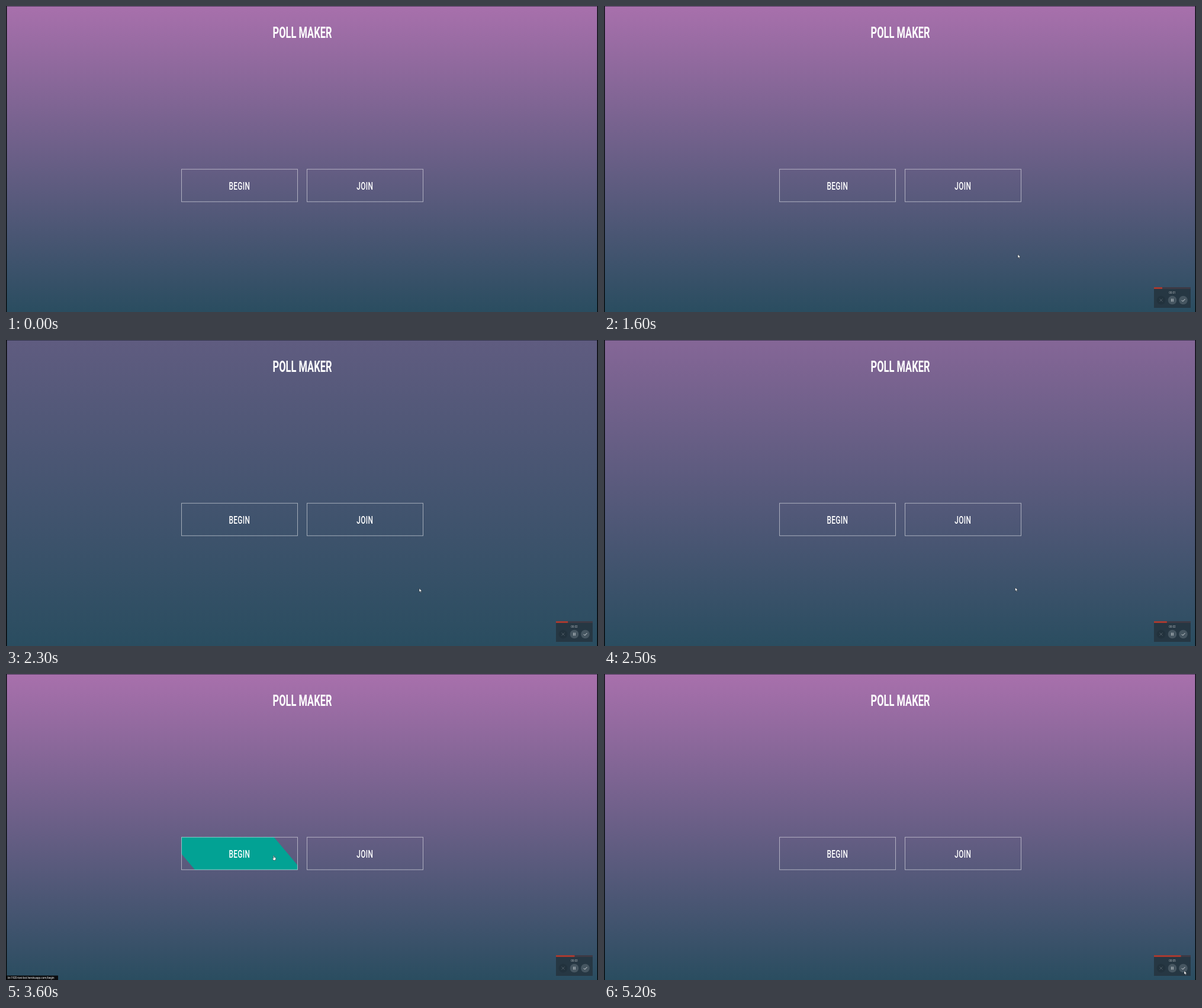
Write an HTML page that moves like this. It is 1000 px wide and 518 px high and loops after 5.3 s.

```html
<!DOCTYPE html>
<html lang="en">
<head>
<meta charset="utf-8">
<title>Poll Maker</title>
<style>
  html, body { margin: 0; width: 100%; height: 100%; overflow: hidden; background: #000; }
  svg { display: block; width: 100%; height: 100%; }
  text { fill: #fff; font-family: Roboto, "Open Sans", sans-serif; }
  .narrow { text-anchor: middle; }
  .title { font-size: 25px; font-weight: 700; }
  .label { font-size: 18px; font-weight: 500; letter-spacing: .5px; }
  .frame { fill: none; stroke: #fff; stroke-opacity: .52; }
  .tiny { font-size: 4.6px; }
  .icon { fill: none; stroke: #e4e8ea; stroke-width: .9; }
</style>
</head>
<body>
<svg viewBox="0 0 1000 518" preserveAspectRatio="none">
  <defs>
    <linearGradient id="sky" x1="0" y1="0" x2="0" y2="1">
      <stop offset="0" stop-color="#a870ac"/>
      <stop offset="1" stop-color="#2a4d60"/>
    </linearGradient>
    <clipPath id="inside"><rect x="296.5" y="276" width="196" height="55.5"/></clipPath>
  </defs>

  <rect x="1.5" width="997" height="518" fill="#2a4d60"/>
  <rect id="glow" x="1.5" width="997" height="518" fill="url(#sky)"/>
  <path d="M1.5 .5H998.5" stroke="#171b2b" stroke-opacity=".6"/>

  <!-- one ratio gives every heading the same narrow face -->
  <g class="narrow" transform="translate(500.5 54) scale(.66 1)"><text class="title">POLL MAKER</text></g>

  <g clip-path="url(#inside)"><path id="fill" fill="#02a294"/></g>

  <g id="buttons">
    <rect class="frame" x="296.5" y="276.3" width="196" height="55"/>
    <rect class="frame" x="508.5" y="276.3" width="196" height="55"/>
    <g class="narrow" transform="translate(394.3 311) scale(.66 1)"><text class="label">BEGIN</text></g>
    <g class="narrow" transform="translate(606.3 311) scale(.66 1)"><text class="label">JOIN</text></g>
  </g>

  <g id="status">
    <rect x="1" y="510.5" width="87" height="7.5" fill="#0a0b0d"/>
    <text class="tiny" x="3" y="516">bt-1920-tovi-bot.herokuapp.com/begin</text>
  </g>

  <g id="panel">
    <rect x="929" y="476" width="62" height="35" fill="#263743"/>
    <rect x="929" y="476" width="62" height="3" fill="#3d3a45"/>
    <rect id="bar" x="929" y="476" height="3" fill="#a83a30"/>
    <text id="clock" class="tiny" x="960" y="487" text-anchor="middle" fill-opacity=".65"></text>
    <circle cx="941" cy="498" r="7.3" fill="#22323d"/>
    <circle cx="960" cy="498" r="7.3" fill="#465661"/>
    <circle cx="978.5" cy="498" r="7.3" fill="#465661"/>
    <path class="icon" d="M938.5 495.5l5 5m0-5l-5 5" stroke-opacity=".25"/>
    <path class="icon" d="M958.8 495.5v5m2.4-5v5"/>
    <path class="icon" d="M975.8 498.2l1.9 1.9 3.8-4"/>
  </g>

  <g id="pointer" stroke="#111a22" stroke-width=".5" fill="#fff">
    <path id="arrow" d="M-1 -3.5V2.6L.5 1.3 1.5 3.6 2.6 3.1 1.6 1H3.5Z"/>
    <path id="hand" d="M-1.3 -3.8Q-.6 -4.5 0 -3.8V-1.3L2.4 -.8Q3 -.5 2.8 .5L2.2 3.8H-1.2L-3 .9Q-2.6 0 -1.3 .8Z"/>
  </g>
</svg>

<script>
const LOOP = 5300, STEP = 100;
const RELOAD = 1700, READY = 1860, FADE = 980;
const ENTER = 3420, LEAVE = 4450;

// time, x, y
const PATH = [
  [0, 700, 424], [1700, 700, 424], [2300, 699, 424], [2500, 695.5, 422.5],
  [3000, 598, 375], [3400, 488, 325], [3600, 453, 311.5], [4200, 453, 311.5],
  [4450, 493, 334], [4900, 925, 480], [5100, 981, 506], [LOOP, 981, 506]
];

const $ = id => document.getElementById(id);
const clamp = v => Math.max(0, Math.min(1, v));
const smooth = v => { v = clamp(v); return v * v * (3 - 2 * v); };
const show = (id, on) => $(id).setAttribute("visibility", on ? "visible" : "hidden");

function pointerAt(t) {
  const i = Math.max(1, PATH.findIndex(p => p[0] >= t));
  const a = PATH[i - 1], b = PATH[i];
  const k = (t - a[0]) / (b[0] - a[0]);
  return [a[1] + (b[1] - a[1]) * k, a[2] + (b[2] - a[2]) * k];
}

// slanted band that widens from the middle of the button
function band(width) {
  const mid = 386, slant = 23.5, h = width / 2;
  return `M${mid - h - slant} 276H${mid + h - slant}L${mid + h + slant} 332H${mid - h + slant}Z`;
}

function draw(t) {
  const loading = t >= RELOAD && t < READY;
  const hover = t >= ENTER && t < LEAVE;
  $("glow").setAttribute("opacity", t < RELOAD ? 1 : smooth((t - READY) / FADE));
  $("buttons").setAttribute("transform", `translate(0 ${loading ? -143.7 : 0})`);

  const grown = 1 - (1 - clamp((t - ENTER) / 490)) ** 2;
  const left = smooth((t - LEAVE) / 400);
  const width = 300 * grown * (1 - left);
  $("fill").setAttribute("d", width > 0 ? band(width) : "");

  show("status", hover);
  show("panel", t >= STEP);
  $("bar").setAttribute("width", t * .00875);
  $("clock").textContent = "00:0" + Math.floor(t / 1000);

  const [x, y] = pointerAt(t);
  $("pointer").setAttribute("transform", `translate(${x} ${y})`);
  show("arrow", t >= STEP && !hover);
  show("hand", hover);
}

const start = performance.now();
function tick() {
  const t = (performance.now() - start) % LOOP;
  draw(Math.floor(t / STEP) * STEP);
  requestAnimationFrame(tick);
}
tick();
</script>
</body>
</html>
```
